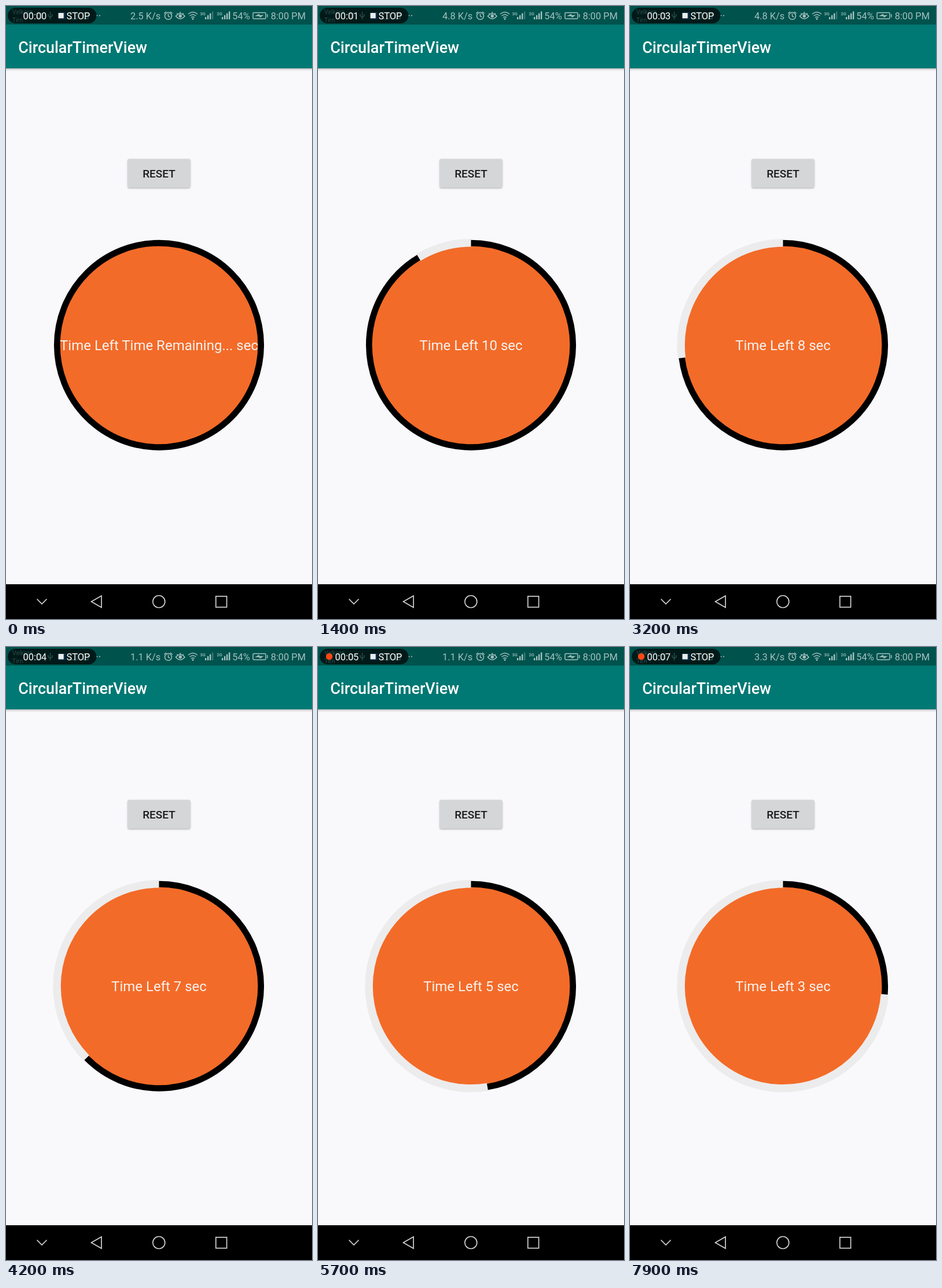
These frames come from a looping animation (529x1058 px, 8000 ms). An HTML page:

```html
<!DOCTYPE html>
<html lang="en">
<head>
<meta charset="utf-8">
<title>CircularTimerView</title>
<style>
  html, body { margin: 0; width: 100%; height: 100%; overflow: hidden; background: #f9f8fb; }
  svg { display: block; width: 100vw; height: 100vh; }
  text { font-family: Roboto, Arial, sans-serif; white-space: pre; }
  .medium { font-weight: 500; }
  .status { font-size: 16.4px; fill: #a5c1bf; }
  .icon { fill: none; stroke: #a5c1bf; stroke-width: 1.5; }
  .pill { font-size: 16.4px; fill: #fff; }
  .nav { fill: none; stroke: #d2d2d2; stroke-width: 1.7; }
  .ring { fill: none; }
  #button { filter: drop-shadow(0 1.5px 1.5px rgba(0, 0, 0, .32)); }
</style>
</head>
<body>
<svg viewBox="0 0 529 1058">
  <defs>
    <linearGradient id="shade" x2="0" y2="1">
      <stop offset="0" stop-color="#000" stop-opacity=".32"/>
      <stop offset=".4" stop-color="#000" stop-opacity=".1"/>
      <stop offset="1" stop-color="#000" stop-opacity="0"/>
    </linearGradient>
  </defs>
  <rect width="529" height="1058" fill="#f9f8fb"/>

  <!-- App bar -->
  <rect y="107" width="529" height="6" fill="url(#shade)"/>
  <rect y="32" width="529" height="75.5" fill="#007873"/>
  <text class="medium" x="21.3" y="80.7" font-size="26.9" fill="#fff">CircularTimerView</text>

  <!-- Status bar -->
  <rect width="529" height="32" fill="#00524d"/>
  <g fill="#a5c1bf">
    <circle cx="153.5" cy="16.5" r="1.1"/>
    <circle cx="157.5" cy="16.5" r="1.1"/>
    <circle cx="162" cy="16.5" r="1.1"/>
  </g>
  <rect x="3" y="3" width="153.5" height="27" rx="13.5" fill="#001413" fill-opacity=".9"/>
  <g font-size="10.5" fill="#2c4b49">
    <text x="11" y="14">Velkora</text>
    <text x="11" y="28">Tirn</text>
  </g>
  <g fill="none" stroke="#2c4b49" stroke-width="1.5">
    <path d="M53 13h8v8h-8zM76.500 10v13M73 14v3l3.500 3l3.500-3v-3"/>
    <path d="M111 11h12v11h-12zM134 12h8v10h-8z"/>
  </g>
  <rect x="91" y="11" width="12" height="12" fill="#0b2a4a"/>
  <circle id="dot" cx="19.500" cy="16.500" r="5.700" fill="#ff4713"/>
  <text id="clock" class="pill" x="29.500" y="22.500"></text>
  <rect x="90.500" y="12" width="9.200" height="9.200" fill="#e9eded"/>
  <text class="pill" x="104.500" y="22.500">STOP</text>

  <text id="speed" class="status" x="215" y="22.500"></text>
  <g class="icon">
    <circle cx="280.500" cy="17.300" r="6"/>
    <path d="M280.500 13.500v4l2.800 1.700M273.300 13l3.800-3.300M287.700 13l-3.800-3.300"/>
    <path d="M293.500 17.500q7.800-9 15.600 0q-7.800 9-15.600 0zM295.500 12.500l1.500 1.600M301.300 10v2.500M307 12.500l-1.500 1.600"/>
    <path d="M315 14q8-7 16 0M317.600 17q5.400-4.600 10.800 0M320 20q3-2.400 6 0"/>
    <rect x="427" y="11.500" width="22" height="10.500" rx="1.500"/>
    <path d="M451.800 14v5.500"/>
  </g>
  <g fill="#a5c1bf">
    <circle cx="301.300" cy="17.300" r="2.700"/>
    <circle cx="323" cy="22.300" r="1.500"/>
    <path d="M430 17.300l8-3.800v2.300h7.500l-7 4.500v-2.500z"/>
    <text class="medium" x="335.500" y="15.500" font-size="7.500">3G</text>
    <text class="medium" x="364.500" y="15.500" font-size="7.500">2G</text>
  </g>
  <g id="bars" fill="#a5c1bf"></g>
  <text class="status" x="391.300" y="22.500">54%</text>
  <text class="status" x="457.700" y="22.500">8:00 PM</text>

  <!-- Button -->
  <rect id="button" x="210.700" y="264" width="107.600" height="49.500" rx="2.500" fill="#d5d6d7"/>
  <text class="medium" x="264.500" y="296" font-size="19" text-anchor="middle" fill="#1b1b1c">RESET</text>

  <!-- Timer -->
  <g transform="translate(264.500 585.300)">
    <circle r="172.500" fill="#f36b28"/>
    <circle id="spent" class="ring" r="176.500" pathLength="360" stroke="#ececed" stroke-width="13.500" transform="rotate(-90) scale(1 -1)"/>
    <circle id="left" class="ring" r="176.250" pathLength="360" stroke="#000" stroke-width="10.700" transform="rotate(-90)"/>
    <text id="label" y="8.300" font-size="24" text-anchor="middle" fill="#f8f3f1"></text>
  </g>

  <!-- Navigation bar -->
  <rect y="998" width="529" height="60" fill="#000"/>
  <g class="nav">
    <path d="M53.500 1023.500l8.500 8.500l8.500-8.500"/>
    <path d="M147.500 1028l17.500-10v20z"/>
    <circle cx="264.300" cy="1028" r="10.500"/>
    <rect x="362.800" y="1018.800" width="18.800" height="18.800"/>
  </g>
</svg>
<script>
  const LOOP = 8000, STEP = 100, SECONDS = 10;
  // [ms, degrees of the ring used up]
  const sweep = [[540, 0], [1400, 30.9], [3200, 97.2], [4200, 134.7], [5700, 189.3], [6600, 218.2], [8000, 269]];
  // [ms, network speed]
  const speeds = [[0, '2.5'], [1000, '4.8'], [4000, '1.1'], [7000, '3.3']];
  const $ = id => document.getElementById(id);

  function setText(id, value) {
    if ($(id).textContent !== value) $(id).textContent = value;
  }

  function angleAt(t) {
    if (t <= sweep[0][0]) return 0;
    const i = sweep.findIndex(([ms]) => ms >= t);
    const [t0, a0] = sweep[i - 1], [t1, a1] = sweep[i];
    return a0 + (a1 - a0) * (t - t0) / (t1 - t0);
  }

  function addBars(x, lit) {
    for (let i = 0; i < 4; i++) {
      const h = 4 + i * 3.2;
      const opacity = i < lit ? 1 : .35;
      $('bars').insertAdjacentHTML('beforeend',
        `<rect x="${x + i * 4}" y="${23 - h}" width="2.4" height="${h}" opacity="${opacity}"/>`);
    }
  }

  function render(t) {
    const angle = angleAt(t);
    const remaining = Math.ceil(SECONDS - angle * SECONDS / 360);
    $('left').setAttribute('stroke-dasharray', `${360 - angle} 720`);
    $('spent').setAttribute('stroke-dasharray', `${angle} 720`);
    $('spent').style.display = angle ? '' : 'none';
    setText('label', `Time Left ${angle ? remaining : 'Time Remaining...'} sec`);
    setText('clock', '00:0' + Math.floor(t / 1000));
    setText('speed', speeds.filter(([ms]) => ms <= t).pop()[1] + ' K/s');
    // Recording light: half a second on, half a second off
    $('dot').style.display = t >= 650 && (t + 350) % 1000 < 500 ? '' : 'none';
  }

  addBars(344, 3);
  addBars(373, 4);

  const start = performance.now();
  function tick() {
    const t = (performance.now() - start + 8) % LOOP;
    render(Math.floor(t / STEP) * STEP);
    requestAnimationFrame(tick);
  }
  tick();
</script>
</body>
</html>
```
